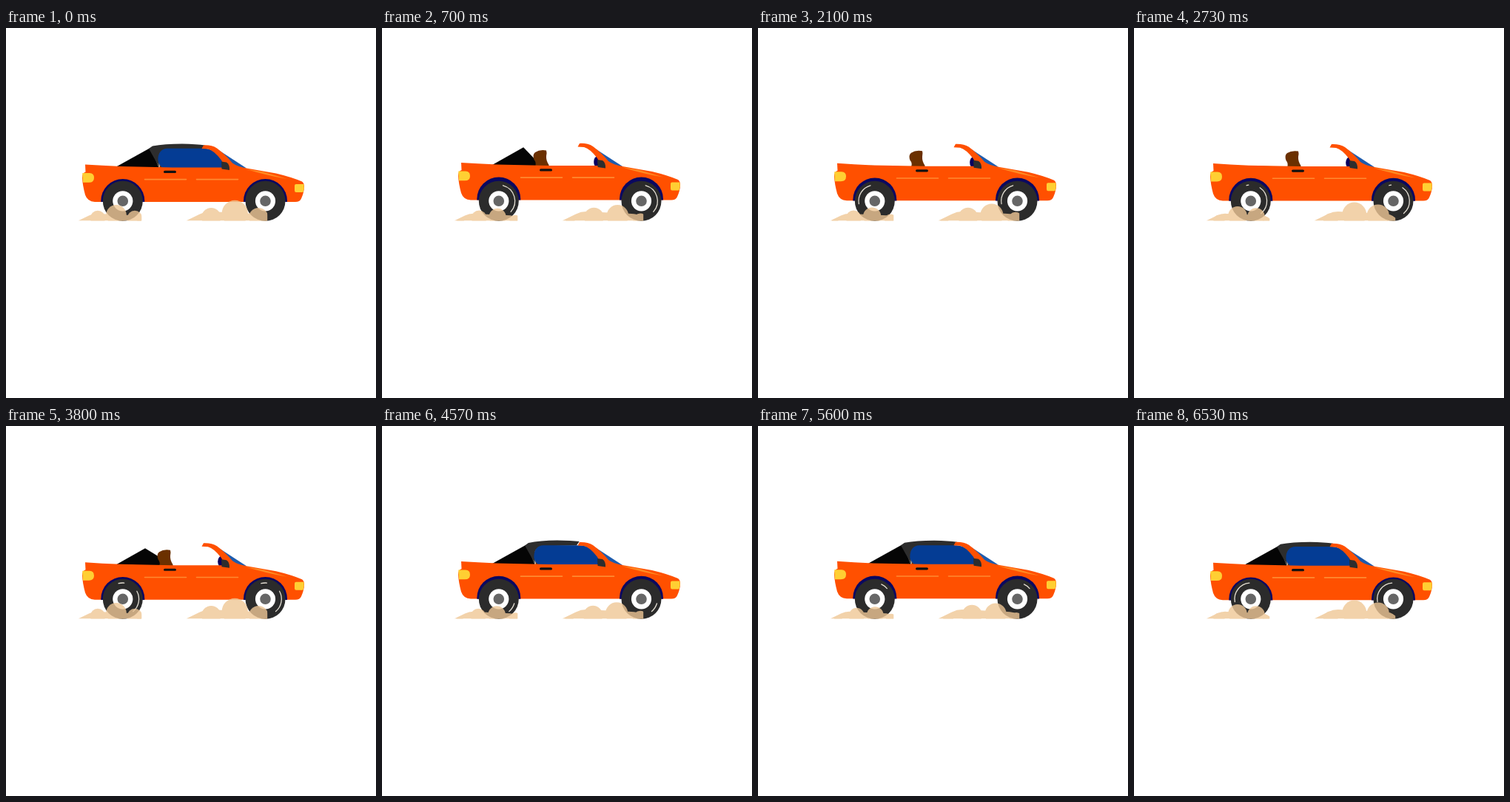
Write an HTML page that moves like this. It is 500x500 px and loops after 6.56 s.

```html
<!DOCTYPE html>
<html lang="en">
<head>
<meta charset="utf-8">
<title>Convertible</title>
<style>
  html, body { margin: 0; width: 100%; height: 100%; overflow: hidden; background: #fff; }
  svg { display: block; width: 100vw; height: 100vh; }
  .shine { fill: none; stroke: #e4dfd4; stroke-width: 1.3; stroke-linecap: round; }
</style>
</head>
<body>
<svg viewBox="0 0 500 500">
  <defs>
    <clipPath id="ground"><path d="M97 220H183.3V260.6H97Z"/></clipPath>
    <g id="rim">
      <circle r="27" fill="#2b2b2b"/>
      <circle r="13.6" fill="#fff"/>
      <circle r="7.3" fill="#666"/>
    </g>
    <g id="dust" clip-path="url(#ground)">
      <path d="M97.500 260.600L112 253.500Q119 250 126 251L168 253Q180 253 183 258V260.600Z"/>
      <g id="puffs"></g>
    </g>
    <path id="arch" d="M-29.5 1.500V0A29.500 29.500 0 0 1 29.500 0V1.500Z" fill="#0a0860"/>
  </defs>

  <g id="car">
    <path id="rear" fill="#050505"/>
    <path fill="#6b3000" d="M207 190Q209 185 205.5 181Q203 174 207 171Q213 167 222 168.5Q223 171 222 176Q221.5 182 225.5 188V190Z"/>
    <ellipse cx="291" cy="184" rx="4.8" ry="7.5" fill="#08005f"/>
    <path id="roof" fill="#2d2d2d" d="M193 163.5L198 160Q214 157 238 157Q258 157.3 269 159L265 164.5H216Q207 167 206 175L207 188.5Z"/>
    <path id="pane" fill="#043c94" d="M212 190Q204 184 205.5 176Q207 164 218 163.4H268Q277 163.5 284 170L296 181V190Z"/>
    <path fill="#1d5cae" d="M285 164L325 190H309L291 172Z"/>
    <path fill="#ff5000" d="M264.5 163.5L267 159Q278 158.5 285 163Q297 172 306 183Q313 188 325 190L365 197Q386 202 400 208Q403 210 403 215Q403 222 399 231Q397 235.5 391 235.5H120Q110 235 107 226Q103.5 213 103 203Q103 196 107.5 195L107 185L130 186.4L155 187.6L225 189H296L291 179Q281 166 273 164Z"/>
    <path fill="#2d2d2d" d="M291 181L298 182Q302.5 185 302 192.5L291.5 191Z"/>
    <path fill="#ff8a22" d="M324 191L348 195L380 204.5Q352 200 324 191Z"/>
    <path stroke="#ff8a30" stroke-width="1.6" stroke-linecap="round" d="M187.5 205.2H243.5M257.5 205.2H313.5"/>
    <rect x="213" y="193.4" width="17" height="3.2" rx="1.6" fill="#111"/>
    <path fill="#ffcf33" d="M103.2 196.5H113Q119 196.5 119 203Q119 209.4 112 209.4H104Z"/>
    <path fill="#ffcf33" d="M392 211.5H402.5Q403.5 217 401.5 222.5H392Q390 222.5 390 220V213.5Q390 211.5 392 211.5Z"/>
    <use href="#arch" x="157.8" y="234.2"/>
    <use href="#arch" x="350.5" y="234.2"/>
  </g>

  <g transform="translate(157.8 233.8)"><use href="#rim"/><path class="shine"/></g>
  <g transform="translate(350.5 233.8)"><use href="#rim"/><path class="shine"/></g>

  <g fill="#efc796">
    <use href="#dust" opacity=".8"/>
    <use href="#dust" opacity=".8" transform="translate(244 260.6) scale(1.28) translate(-98 -260.6)"/>
  </g>
</svg>
<script>
const LOOP = 6560, STEP = 200 / 3, LAST_TICK = 93;
const GROUND = 260.6, PUFF_COUNT = 4, PUFF_CYCLE = 18, SHINE_CYCLE = 7;
const el = id => document.getElementById(id);
const clamp = (v, low = 0, high = 1) => Math.max(low, Math.min(high, v));
const mix = (a, b, t) => a + (b - a) * t;

const puffs = Array.from({ length: PUFF_COUNT }, () =>
  el("puffs").appendChild(document.createElementNS("http://www.w3.org/2000/svg", "circle")));
const shines = document.querySelectorAll(".shine");

// Ten steps per 700 ms; the last of each ten holds a little longer.
function tickAt(time) {
  if (time < 100) return 0;
  const rest = time - 100, block = Math.floor(rest / 700);
  return Math.min(LAST_TICK, 1 + block * 10 + Math.min(9, Math.floor((rest % 700 + 3.4) / STEP)));
}

function drawTop(closed) {
  const rise = clamp(closed / 0.2), settle = clamp((closed - 0.2) / 0.3);
  const extend = clamp((closed - 0.4) / 0.55), lift = clamp((closed - 0.45) / 0.45);
  const peakX = mix(188, 194, settle), peakY = mix(mix(190, 166, rise), 163, settle);
  const sideX = mix(206, 202, settle), sideY = mix(mix(190, 177, rise), 178, settle);
  el("rear").setAttribute("d",
    `M149 188L${peakX} ${peakY}L${sideX} ${sideY}L${mix(222, 207, settle)} 190Z`);
  el("roof").style.display = extend > 0 ? "" : "none";
  el("roof").setAttribute("transform",
    `translate(194 163) rotate(${-25 * (1 - extend)}) scale(${extend} 1) translate(-194 -163)`);
  el("pane").setAttribute("transform", `translate(0 ${28 * (1 - lift)})`);
}

// Angles run clockwise from the top of the tyre.
function arc(from, to) {
  if (to - from < 1) return "";
  const point = deg => {
    const a = deg * Math.PI / 180;
    return `${(21.8 * Math.sin(a)).toFixed(2)} ${(-21.8 * Math.cos(a)).toFixed(2)}`;
  };
  return `M${point(from)}A21.8 21.8 0 0 1 ${point(to)}`;
}

// A long streak sweeps over the tyre, then a short one speeds up after it.
function drawShine(tick) {
  const progress = tick / LAST_TICK;
  const turn = 85 * progress + 2.7 * Math.sin(Math.PI * progress ** 1.5);
  const stage = (turn + 0.001) % SHINE_CYCLE;
  const fall = Math.max(0, stage - 3) ** 2;
  const long = arc(clamp(80 * (stage - 1) - 100, -100, 140), clamp(95 * stage - 100, -100, 140));
  const short = arc(
    Math.min(140, 13.3 * fall - 15),
    Math.min(140, 15 * fall - 15 + 20 * clamp(2 * (stage - 2.5))));
  shines.forEach(shine => shine.setAttribute("d", long + short));
}

// Each puff drifts back, swelling and then sinking over its life.
function drawDust(tick) {
  const phase = tick % PUFF_CYCLE / PUFF_CYCLE;
  const swell = 1 + 0.12 * Math.cos(2 * Math.PI * phase);
  puffs.forEach((puff, n) => {
    const life = n + phase ** 0.57;
    const height = 1 + 18.5 * swell * Math.sin(Math.PI * life / PUFF_COUNT) ** 1.4;
    const radius = 4 + 0.45 * height;
    puff.setAttribute("cx", Math.min(180, 199 - 25 * life));
    puff.setAttribute("cy", GROUND - height + radius);
    puff.setAttribute("r", radius);
  });
}

function draw(time) {
  const tick = tickAt(time);
  const bounce = -0.3 - 1.4 * (1 - Math.cos(2 * Math.PI * (0.11 + 0.44 * tick)));
  el("car").setAttribute("transform", `translate(0 ${bounce.toFixed(2)})`);
  drawTop(tick < 40 ? 1 - clamp((tick - 1) / 14) : clamp((tick - 51) / 15));
  drawShine(tick);
  drawDust(tick);
}

const start = performance.now();
function frame() {
  draw((performance.now() - start) % LOOP);
  requestAnimationFrame(frame);
}
frame();
</script>
</body>
</html>
```
